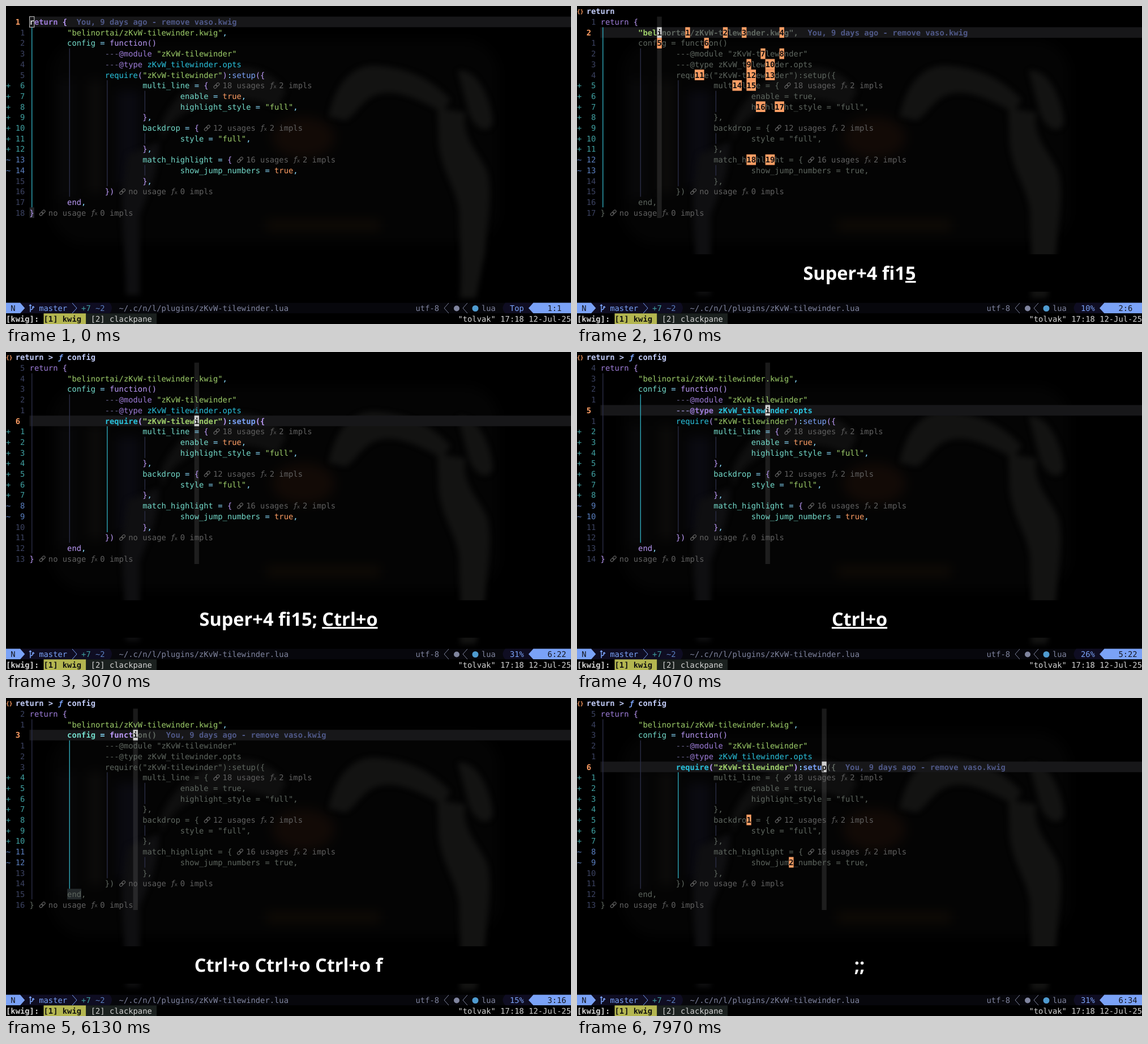
Animation, 998 px wide and 561 px high, one loop 8000 ms. Source, as an HTML page:

```html
<!DOCTYPE html>
<html lang="en">
<head>
<meta charset="utf-8">
<title>Editor session</title>
<style>
  html, body { margin: 0; width: 100%; height: 100%; overflow: hidden; background: #000; }
  svg { display: block; width: 100vw; height: 100vh; }
  text { white-space: pre; text-rendering: geometricPrecision; font-family: "DejaVu Sans Mono", monospace; font-size: 13.8px; font-variant-ligatures: none; }
  .keys { font: bold 32.5px "Noto Sans", "Open Sans", sans-serif; fill: #fff; text-anchor: middle; }
  .recent { text-decoration: underline; text-decoration-thickness: 2px; }
</style>
</head>
<body>
<svg viewBox="0 0 998 561" preserveAspectRatio="none">
  <defs>
    <filter id="soft" x="-20%" y="-20%" width="140%" height="140%" color-interpolation-filters="sRGB"><feGaussianBlur stdDeviation="5"/></filter>
    <filter id="haze" x="-50%" y="-50%" width="200%" height="200%" color-interpolation-filters="sRGB"><feGaussianBlur stdDeviation="10"/></filter>
  </defs>
  <rect width="998" height="561" fill="#000"/>
  <g filter="url(#haze)">
    <rect x="80" y="60" width="790" height="360" rx="60" fill="#040404"/>
    <ellipse cx="525" cy="232" rx="55" ry="36" fill="#120a06"/>
    <rect x="460" y="380" width="200" height="14" fill="#130d06"/>
    <rect x="95" y="130" width="24" height="210" fill="#09090b"/>
    <rect x="145" y="130" width="26" height="200" fill="#0c0b0a"/>
    <rect x="196" y="150" width="40" height="170" fill="#0a0a11"/>
  </g>
  <g filter="url(#soft)" fill="#131312">
    <path d="M275 205C300 150 350 112 410 108C450 106 480 128 495 150L478 180C440 162 400 160 370 167C320 180 292 198 275 238Z" fill="#0f0f0f"/>
    <path d="M205 330L215 262L270 240C270 300 250 330 236 370V510H212C212 450 205 400 205 330Z" fill="#0f0f11"/>
    <path d="M570 195C580 140 610 105 650 105C700 108 745 122 785 165L772 188C725 162 690 148 660 155C630 162 622 188 600 202Z"/>
    <path d="M762 180L812 188C802 230 838 262 850 292C860 330 850 380 846 435L830 515H802C806 450 800 400 800 360C795 320 768 290 764 240Z"/>
    <path d="M798 115C830 108 856 160 860 205C852 228 830 218 818 190Z"/>
  </g>
  <g id="screen"></g>
</svg>
<script>
const LOOP = 8000, CW = 998 / 120, RH = 18.7, GUTTER = 5;
const BLAME_DELAY = 445, KEYS_HIDE = 980, UNDERLINE = 400;
const BLAME = 'You, 9 days ago - remove vaso.kwig';
const screen = document.getElementById('screen');

const C = {
  purple: '#9d7cd8', brace: '#bb9af7', string: '#9ece6a', field: '#73daca', op: '#89ddff',
  cyan: '#2ac3de', func: '#7aa2f7', bool: '#ff9e64', note: '#6f6894', dim: '#5e665f',
  lens: '#606060', blame: '#4f5887', add: '#3f9fa0', change: '#5a7fc0', num: '#3b4261',
  guide: '#2a2d45', scope: '#2fa7b8', winbar: '#c0caf5', dark: '#15161e'
};

// Each line: indent, then "colour:text" runs
const SRC = [
  [0, 'purple:return', 'brace: {'],
  [1, 'string:"belinortai/zKvW-tilewinder.kwig"', 'op:,'],
  [1, 'field:config', 'op: = ', 'brace:function()'],
  [2, 'note:---', 'purple:@module ', 'string:"zKvW-tilewinder"'],
  [2, 'note:---', 'purple:@type ', 'cyan:zKvW_tilewinder.opts'],
  [2, 'cyan:require', 'brace:(', 'string:"zKvW-tilewinder"', 'brace:)', 'op::', 'func:setup', 'brace:({'],
  [3, 'field:multi_line', 'op: = ', 'brace:{'],
  [4, 'field:enable', 'op: = ', 'bool:true', 'op:,'],
  [4, 'field:highlight_style', 'op: = ', 'string:"full"', 'op:,'],
  [3, 'brace:}', 'op:,'],
  [3, 'field:backdrop', 'op: = ', 'brace:{'],
  [4, 'field:style', 'op: = ', 'string:"full"', 'op:,'],
  [3, 'brace:}', 'op:,'],
  [3, 'field:match_highlight', 'op: = ', 'brace:{'],
  [4, 'field:show_jump_numbers', 'op: = ', 'bool:true', 'op:,'],
  [3, 'brace:}', 'op:,'],
  [2, 'brace:})'],
  [1, 'brace:end', 'op:,'],
  [0, 'brace:}']
];
const LENS = { 7: ['18 usages', '2 impls'], 11: ['12 usages', '2 impls'], 14: ['16 usages', '2 impls'],
  17: ['no usage', '0 impls'], 19: ['no usage', '0 impls'] };
// Indent guides: depth, first line, last line
const GUIDES = [[0, 2, 18], [1, 4, 17], [2, 7, 16], [3, 8, 9], [3, 12, 12], [3, 15, 15]];
const SCOPE = [, 0, 0, 1, 1, 1, 2, 3];

const LINES = SRC.map(([indent, ...runs]) => {
  const cells = Array.from({ length: indent * 8 }, () => ({ ch: ' ', fill: C.op }));
  for (const run of runs) {
    const cut = run.indexOf(':');
    for (const ch of run.slice(cut + 1)) cells.push({ ch, fill: C[run.slice(0, cut)] });
  }
  return { indent, cells };
});

// Cursor: time, line, column, search ("f" while waiting for a character)
const POSES = [
  [-999, 1, 0], [500, 1, 0, 'f'], [930, 2, 12, 'i'], [1980, 7, 31, 'i'], [2940, 6, 35], [4030, 5, 35],
  [4530, 4, 38], [4970, 3, 22], [5730, 3, 22, 'f'], [6215, 5, 22, 'p'], [7280, 5, 42, 'p'], [7430, 6, 47, 'p']
];
const KEYS = [
  [130, 'Super+4'], [470, 'f'], [880, 'i'], [1350, '1'], [1600, '5'], [1950, ';'], [2910, 'Ctrl+o'],
  [4000, 'Ctrl+o'], [4500, 'Ctrl+o'], [4940, 'Ctrl+o'], [5700, 'f'], [6180, 'p'], [7250, ';'], [7400, ';']
];

const esc = s => s.replace(/&/g, '&amp;').replace(/</g, '&lt;');
const px = n => +n.toFixed(2);

// Text on the terminal grid
function put(col, row, str, fill, bold) {
  const xs = [...str].map((_, i) => px((col + i) * CW)).join(' ');
  return `<text x="${xs}" y="${px(row * RH + 14.3)}" fill="${fill}"${bold ? ' font-weight="bold"' : ''}>${esc(str)}</text>`;
}

function box(col, row, cols, rows, fill, extra = '') {
  return `<rect x="${px(col * CW)}" y="${px(row * RH)}" width="${px(cols * CW)}" height="${px(rows * RH)}" fill="${fill}" ${extra}/>`;
}

const shape = (d, fill, stroke = 'none', width = 1) =>
  `<path d="${d}" fill="${fill}" stroke="${stroke}" stroke-width="${width}"/>`;

const small = (x, y, str, size, fill, more = '') =>
  `<text x="${px(x)}" y="${px(y)}" fill="${fill}" style="font-size:${size}px;${more}">${str}</text>`;

function linkIcon(col, row) {
  const ring = x => `<rect x="${x}" y="-2.2" width="6.6" height="4.4" rx="2.2"/>`;
  return `<g transform="translate(${px(col * CW + 6)} ${px(row * RH + 9.5)}) rotate(-45)" fill="none" stroke="${C.lens}" stroke-width="1.2">${ring(-6)}${ring(-0.6)}</g>`;
}

function lens(line) {
  const [uses, impls] = LENS[line];
  const col = GUTTER + LINES[line - 1].cells.length + 1;
  const fx = col + 3 + uses.length;
  return linkIcon(col, line) + put(col + 2, line, uses, C.lens) +
    small(fx * CW, line * RH + 13.5, 'ƒ', 13, C.lens, 'font-style:italic') +
    small(fx * CW + 6.5, line * RH + 14, 'x', 9, C.lens) + put(fx + 2, line, impls, C.lens);
}

// Numbers over every later match of the searched character
function labels(line, col, ch) {
  const found = [];
  if (!ch || ch === 'f') return found;
  LINES.forEach(({ cells }, i) => cells.forEach((cell, c) => {
    const later = i + 1 > line || (i + 1 === line && c > col);
    if (cell.ch === ch && later) found.push([i + 1, c]);
  }));
  return found;
}

function codeLine(line, cur, col, search) {
  const bold = line === cur, { cells } = LINES[line - 1];
  let out = '', run = '', start = 0, fill = '';
  const flush = () => { if (run.trim()) out += put(GUTTER + start, line, run, fill, bold); run = ''; };
  cells.forEach((cell, c) => {
    const late = line > cur || (line === cur && c > col);
    const f = line === cur && c === col ? '#ddd' : search && late ? C.dim : cell.fill;
    if (f !== fill) { flush(); start = c; fill = f; }
    run += cell.ch;
  });
  flush();
  return out;
}

function gutter(line, cur) {
  const sign = line < 7 || line > 15 ? '' : line < 14 ? '+' : '~';
  const tint = sign === '+' ? C.add : C.change;
  const num = String(line === cur ? line : Math.abs(line - cur));
  const fill = sign ? tint : line === cur ? C.bool : C.num;
  return (sign ? put(0, line, sign, tint) : '') +
    put(line === cur ? 2 : 4 - num.length, line, num, fill, line === cur);
}

function winbar(line) {
  if (line === 1) return '';
  const crumbs = ['return'];
  if (line > 2) crumbs.push('config');
  if (line > 6) crumbs.push('require("zKvW-tilewinder"):setup', 'multi_line');
  let col = 0, out = '';
  crumbs.forEach((name, i) => {
    if (i) { out += put(col + 1, 0, '>', C.winbar, true); col += 3; }
    out += i === 1
      ? small(col * CW + 1, 13.8, 'ƒ', 13, C.func, 'font-style:italic;font-weight:bold')
      : small(col * CW, 13, '{}', 9.5, C.bool, 'font-weight:bold');
    out += put(col + 2, 0, name, C.winbar, true);
    col += 2 + name.length;
  });
  return out;
}

function statusBar(line, col) {
  const { indent } = LINES[line - 1], r = 28;
  const place = `${line}:${col - indent * 7 + 1}`;
  const share = line === 1 ? 'Top' : Math.floor(line / 19 * 100) + '%';
  const navy = '#0f0d22', grey = '#80859f';
  return box(0, r, 120, 1, '#07070c') +
    shape('M25 523.6H183Q191 533 183 542.3H25Z', navy) +
    shape('M0 523.6H25L33.3 533L25 542.3H0Z', C.func) + put(1, r, 'N', C.dark) +
    shape('M43 527V540M43 536Q48 535.5 48 530.5M41 529L43 527L45 529M46 532L48 530L50 532', 'none', C.func, 1.5) +
    put(7, r, 'master', C.func) + shape('M117 524L125 533L117 542', 'none', C.func) +
    put(16, r, '+7', C.add) + put(19, r, '~2', C.change) +
    put(24, r, '~/.c/n/l/plugins/zKvW-tilewinder.lua', grey) +
    put(87, r, 'utf-8', grey) +
    shape('M782 524L774 533L782 542M815 524L807 533L815 542', 'none', grey) +
    `<circle cx="796" cy="533.5" r="5" fill="${grey}"/><circle cx="829" cy="533.5" r="5.5" fill="#4f9bd0"/>` +
    put(101, r, 'lua', grey) +
    shape('M882 523.6H932V542.3H882Q873 533 882 523.6Z', navy) + put(107, r, share, C.func) +
    shape('M998 523.6H931.5L923 533L931.5 542.3H998Z', C.func) + put(115, r, place, C.dark);
}

function sessionBar() {
  const r = 29, white = '#d4d4d4';
  return box(0, r, 120, 1, '#000') + put(0, r, '[kwig]:', white, true) +
    box(8, r, 9, 1, '#b4b650') + put(8, r, '[1] kwig', '#111', true) +
    box(17, r, 15, 1, '#1b211f') + put(18, r, '[2] clackpane', white) +
    put(96, r, '"tolvak" 17:18 12-Jul-25', white);
}

function keyPanel(t) {
  let typed = [], last = -Infinity;
  for (const [at, key] of KEYS) {
    if (at > t) break;
    if (at - last > KEYS_HIDE) typed = [];
    typed.push(key);
    last = at;
  }
  if (t - last >= KEYS_HIDE) return '';
  let out = '';
  typed.forEach((key, i) => {
    const gap = i && (key.length > 1 || typed[i - 1].length > 1) ? ' ' : '';
    const recent = i === typed.length - 1 && t - last < UNDERLINE;
    out += gap + (recent ? `<tspan class="recent">${key}</tspan>` : key);
  });
  return `<rect y="438" width="998" height="66" fill="#000"/><text class="keys" x="499" y="483">${out}</text>`;
}

function editor(t) {
  let p = POSES.findLastIndex(pose => pose[0] <= t);
  const [, line, col, search] = POSES[p];
  while (p && POSES[p - 1][1] === line) p--;
  const blame = line < 7 && t - POSES[p][0] >= BLAME_DELAY;
  const focused = t >= KEYS[0][0], x = GUTTER + col;

  let out = box(GUTTER, line, 115, 1, '#171719');
  if (line > 1) out += box(x, 1, 1, 19, '#fff', 'fill-opacity=".1"');
  if (line === 1) out += box(GUTTER, 19, 1, 1, '#24262a');
  if (line === 3) out += box(GUTTER + 8, 18, 3, 1, '#24292b');

  for (const [depth, from, to] of GUIDES) {
    const active = depth === SCOPE[line] && (depth < 3 || from === line + 1);
    const gx = px((GUTTER + depth * 8 + 0.5) * CW);
    out += shape(`M${gx} ${px(from * RH)}V${px((to + 1) * RH)}`, 'none', active ? C.scope : C.guide, 1.4);
  }
  for (let l = 1; l <= 19; l++) {
    out += gutter(l, line) + codeLine(l, line, col, search);
    if (LENS[l]) out += lens(l);
  }
  if (blame) out += put(GUTTER + LINES[line - 1].cells.length + 2, line, BLAME, C.blame, true);

  labels(line, col, search).forEach(([row, c], i) => {
    const n = String(i + 1);
    out += box(GUTTER + c, row, n.length, 1, C.bool) + put(GUTTER + c, row, n, '#111', true);
  });
  if (focused) {
    out += box(x, line, 1, 1, '#cfcfcf') + put(x, line, LINES[line - 1].cells[col].ch, '#111', true);
  } else {
    out += box(x, line, 1, 1, 'none', 'stroke="#cfcfcf"');
  }
  return winbar(line) + out + statusBar(line, col);
}

const bottom = sessionBar();
let shown = '';
function draw(now) {
  const t = now % LOOP;
  const next = editor(t) + bottom + keyPanel(t);
  if (next !== shown) screen.innerHTML = shown = next;
}

const begin = performance.now();
function tick() {
  draw(performance.now() - begin);
  requestAnimationFrame(tick);
}
tick();
</script>
</body>
</html>
```
